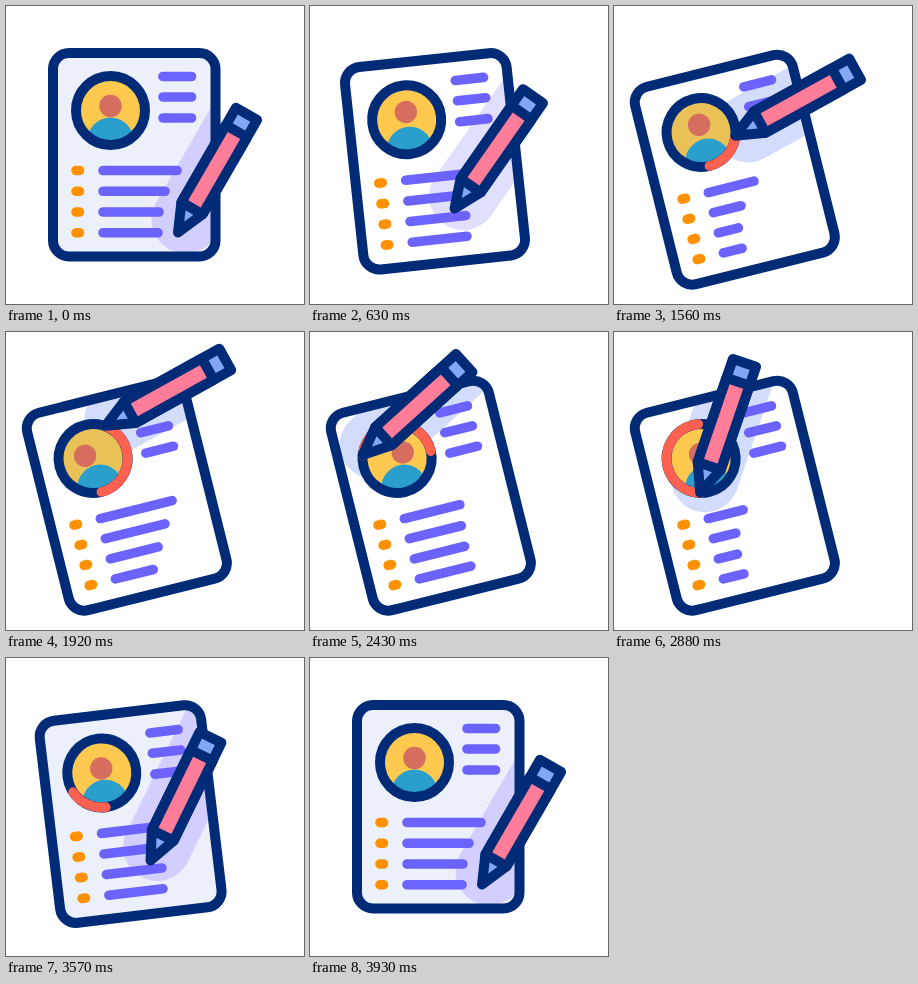
Recreate the animation shown at these times as an HTML page. Size 298 by 298 pixels, loop 4.5 s.

```html
<!DOCTYPE html>
<html lang="en">
<head>
<meta charset="utf-8">
<title>Profile form</title>
<style>
  html, body { margin: 0; width: 100%; height: 100%; overflow: hidden; background: #fff; }
  svg { display: block; width: 100vw; height: 100vh; }
  .ink { stroke: #012b77; stroke-width: 10; stroke-linejoin: round; }
  .round { fill: none; stroke-width: 9.6; stroke-linecap: round; }
</style>
</head>
<body>
<svg viewBox="0 0 298 298">
  <defs>
    <clipPath id="sheetClip"><rect class="sheet" x="47" y="47" width="162.5" height="203.5" rx="16"/></clipPath>
    <clipPath id="faceClip"><circle r="34.5"/></clipPath>
  </defs>

  <rect id="fill" class="sheet" x="47" y="47" width="162.5" height="203.5" rx="16"/>

  <g clip-path="url(#sheetClip)">
    <path id="shade" class="pen" d="M15 0H150" fill="none" stroke-width="68" stroke-linecap="round"/>
  </g>

  <g class="sheet">
    <path class="round" stroke="#6c63ff" d="M157 70.5h28.5M157 91h28.5M157 112h28.5"/>
    <path class="round" stroke="#ff9100" d="M70 164.5h3.5M70 185.3h3.5M70 206h3.5M70 226.8h3.5"/>
    <path id="rows" class="round" stroke="#6c63ff"/>
    <g transform="translate(104.5 104.5)">
      <circle id="face" r="34.5"/>
      <g clip-path="url(#faceClip)">
        <circle cy="30" r="23" fill="#2a9fcb"/>
        <circle id="head" r="11.2" fill="#d56e5f"/>
      </g>
      <circle class="ink" r="34.5" fill="none"/>
      <path id="arc" class="round" stroke="#ff6150"/>
    </g>
    <rect class="ink" x="47" y="47" width="162.5" height="203.5" rx="16" fill="none"/>
  </g>

  <g class="pen ink">
    <path fill="#84a6f6" d="M0 0L28-12.2H137V12.2H28Z"/>
    <path fill="#ff7d99" d="M28-12.2H117V12.2H28Z"/>
  </g>
</svg>

<script>
const LOOP = 4500, TILT = 14, RING = 34.5;
const START = 300, DRAW = 1225, LEAVE = 2955, END = 3915;
const REST = [172, 226.5];
const ROWS = [74, 62, 56, 55];

const $ = id => document.getElementById(id);
const sheets = document.querySelectorAll('.sheet');
const pens = document.querySelectorAll('.pen');

const rad = deg => deg * Math.PI / 180;
const mix = (a, b, p) => a + (b - a) * p;
const within = (t, a, b) => t >= a && t < b;

// Progress from a to b: linear, eased, and there-and-back
const span = (t, a, b) => Math.min(1, Math.max(0, (t - a) / (b - a)));
const ease = (t, a, b) => (1 - Math.cos(Math.PI * span(t, a, b))) / 2;
const hump = (t, a, b) => Math.sin(Math.PI * span(t, a, b)) ** 2;

function onRing(deg, cx = 0, cy = 0) {
  return [cx + RING * Math.cos(rad(deg)), cy + RING * Math.sin(rad(deg))];
}

function penTip(t) {
  const ring = onRing(90 - TILT - 360 * span(t, DRAW, LEAVE), 87, 126);
  const away = t < DRAW ? 1 - span(t, START, DRAW) : span(t, LEAVE, END);
  return ring.map((v, i) => mix(v, REST[i], away));
}

// Leans down to write, then rises while closing the circle
function penLean(t) {
  return 60 - 31 * ease(t, START, 1570) + 44 * ease(t, 2100, 3000) - 13 * ease(t, 3000, END);
}

function arcPath(t) {
  const head = 90 - 360 * span(t, DRAW, LEAVE);
  const tail = 90 - 360 * span(t, 1950, END);
  const sweep = tail - head;
  if (sweep < 0.5) return '';
  const mid = onRing(tail - sweep / 2), size = `A${RING} ${RING} 0 0 0 `;
  return `M${onRing(tail)}${size}${mid}${size}${onRing(head)}`;
}

// Each row shrinks twice, a little later and slower than the row above
function rowPath(full, i, t) {
  const from = 830 + 35 * i, time = 1000 + 95 * i;
  const dip = hump(t, from, from + time) + hump(t - 1400, from, from + time);
  return `M97 ${164.5 + 20.75 * i}h${full * (1 - 0.65 * dip)}`;
}

function draw(t) {
  const k = ease(t, START, 1020) - ease(t, 3205, 3925);
  const tilt = `translate(${-7.5 * k} ${14.9 * k}) rotate(${-TILT * k} 128.5 148.5)`;
  sheets.forEach(s => s.setAttribute('transform', tilt));

  const [x, y] = penTip(t);
  const hold = `translate(${x} ${y}) rotate(${-penLean(t)})`;
  pens.forEach(p => p.setAttribute('transform', hold));

  $('rows').setAttribute('d', ROWS.map((full, i) => rowPath(full, i, t)).join(''));
  $('arc').setAttribute('d', arcPath(t));

  // Look up, then left and right
  $('head').setAttribute('cx', -7 * Math.sin(2 * Math.PI * span(t, 1665, 2685)));
  $('head').setAttribute('cy', -4.5 - 9 * hump(t, START, 1900));

  $('fill').setAttribute('fill', within(t, 330, 3030) ? '#fff' : '#ecf0fa');
  $('face').setAttribute('fill', within(t, 870, 1950) ? '#e9c157' : '#ffc84f');
  $('shade').setAttribute('stroke',
    within(t, 330, 870) ? '#e0dffd' : within(t, 870, 3570) ? '#d3ddfb' : '#d2cfff');
}

function tick() {
  draw(performance.now() % LOOP);
  requestAnimationFrame(tick);
}
tick();
</script>
</body>
</html>
```
